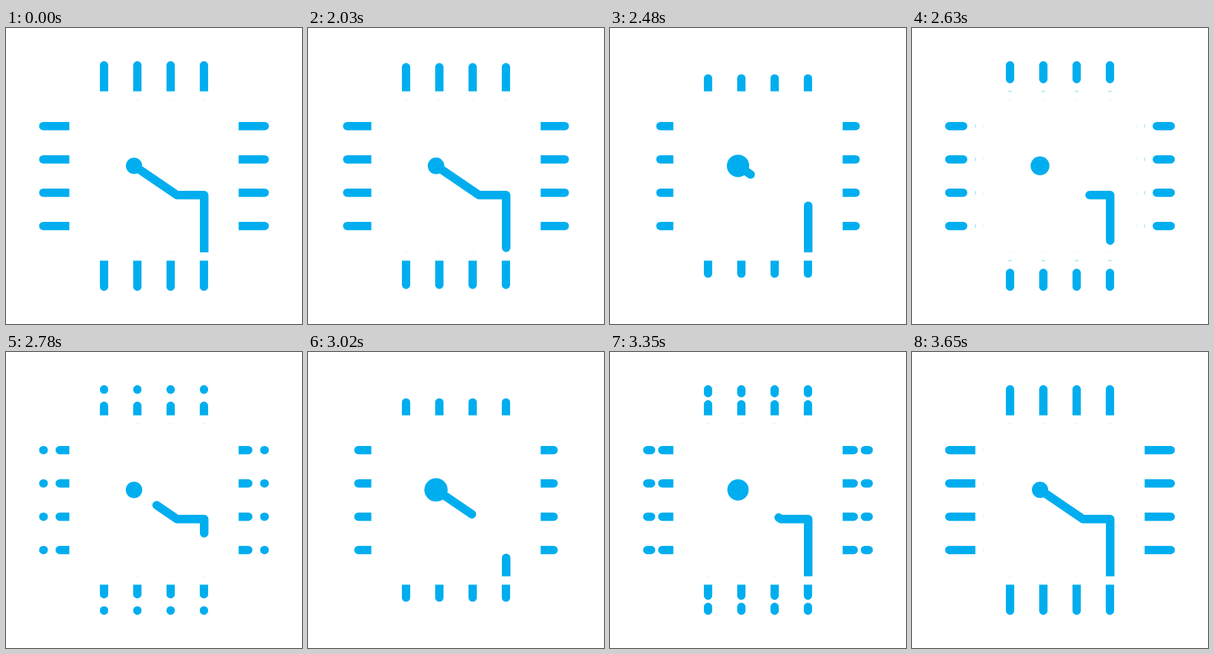
Recreate the animation shown at these times as an HTML page with a canvas. Size 400x400 px, loop 3.83 s.

```html
<!DOCTYPE html>
<html lang="en">
<head>
<meta charset="utf-8">
<title>Microchip</title>
<style>
  html, body { margin: 0; width: 100%; height: 100%; overflow: hidden; background: #fff; }
  canvas { display: block; width: 400px; height: 400px; }
</style>
</head>
<body>
<canvas id="stage" width="400" height="400"></canvas>
<script>
const ctx = document.getElementById('stage').getContext('2d');
const BLUE = '#00aeef';
const LOOP = 3830, START = 2000, STEP = 30, STEPS = 55;
const CENTER = 200, FRAME = 108.8, TIP = 149.6;
const PIN_OFFSETS = [-67.5, -22.5, 22.5, 67.5];
const TRACE = [[267.8, 308.8], [267.8, 225.7], [231, 225.7], [173, 186.3]];

const clamp = x => Math.min(1, Math.max(0, x));
const smooth = x => x * x * (3 - 2 * x);

function polylineLength(points) {
  return points.slice(1).reduce((sum, [x, y], i) =>
    sum + Math.hypot(x - points[i][0], y - points[i][1]), 0);
}

// Strokes the line with one gap; the visible part wraps around its ends.
function strokeWithGap(points, width, gap, shift) {
  const length = polylineLength(points);
  ctx.lineWidth = width;
  ctx.setLineDash(gap > 0 ? [length * (1 - gap) - 0.001, length * gap + 0.001] : []);
  ctx.lineDashOffset = -length * (gap + shift);
  ctx.beginPath();
  points.forEach(([x, y]) => ctx.lineTo(x, y));
  ctx.stroke();
}

function drawPins(gap, shift) {
  for (const side of [-1, 1]) {
    const tip = CENTER + side * TIP, base = CENTER + side * FRAME;
    for (const offset of PIN_OFFSETS) {
      const across = CENTER + offset;
      strokeWithGap([[across, tip], [across, base]], 11.25, gap, shift);
      strokeWithGap([[tip, across], [base, across]], 11.25, gap, shift);
    }
  }
}

// Two pulses, each with a quick swell and a slower return.
function dotRadius(step) {
  const phase = (step / STEPS * 2) % 1;
  const swell = phase < 1 / 3 ? phase * 3 : (1 - phase) * 1.5;
  return 11 + 6 * smooth(swell);
}

function draw(time) {
  const step = Math.min(STEPS, Math.max(0, Math.floor((time % LOOP - START) / STEP)));
  const gap = 0.53 * Math.min(clamp(step / 8.5), clamp((52 - step) / 10));
  const travel = clamp((step - 7.87) / 45);

  ctx.fillStyle = '#fff';
  ctx.fillRect(0, 0, 400, 400);
  ctx.strokeStyle = ctx.fillStyle = BLUE;
  ctx.lineCap = ctx.lineJoin = 'round';
  drawPins(gap, travel * 5);
  strokeWithGap(TRACE, 11.5, gap, travel * 2);

  ctx.beginPath();
  ctx.arc(173, 186.3, dotRadius(step), 0, Math.PI * 2);
  ctx.fill();

  // White chip outline separates the pins from the inside.
  ctx.setLineDash([]);
  ctx.lineWidth = 11.25;
  ctx.lineJoin = 'miter';
  ctx.strokeStyle = '#fff';
  ctx.strokeRect(CENTER - FRAME, CENTER - FRAME, FRAME * 2, FRAME * 2);
}

const begin = performance.now();
function tick() {
  draw(performance.now() - begin);
  requestAnimationFrame(tick);
}
tick();
</script>
</body>
</html>
```
